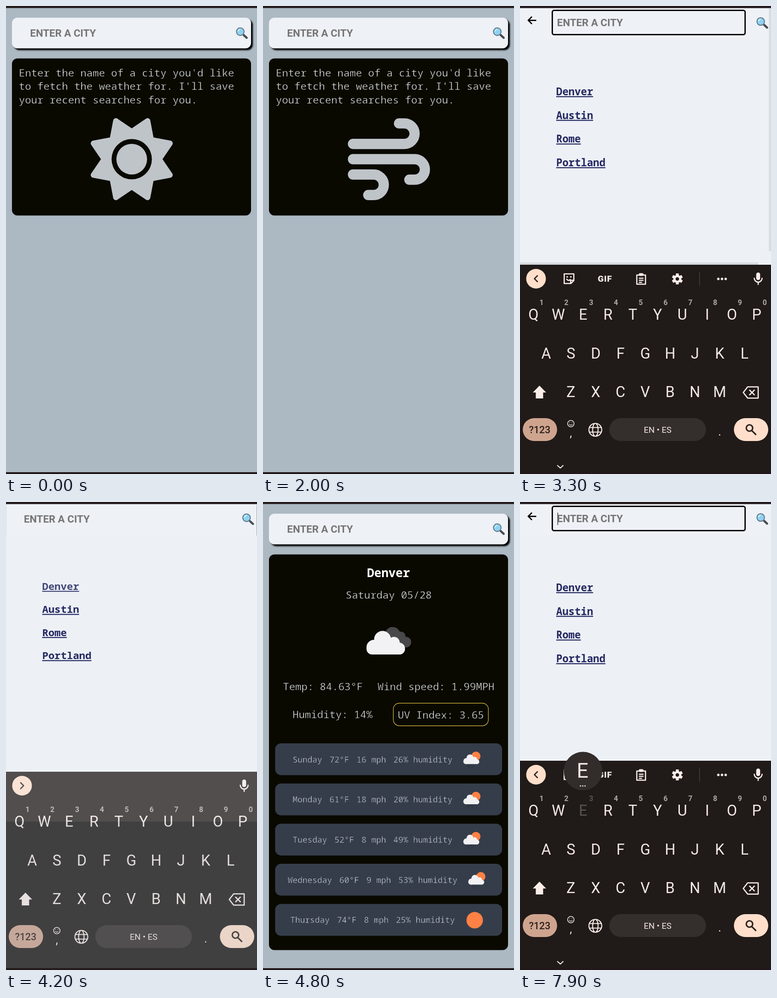
Animation, 548 px wide and 1022 px high, one loop 8 s. Source, as an HTML page:

```html
<!DOCTYPE html>
<html lang="en">
<head>
<meta charset="utf-8">
<title>Weather search</title>
<style>
  html, body { margin: 0; height: 100%; overflow: hidden; background: #acb8c2; }
  svg { display: block; width: 100vw; height: 100vh; }
  text { white-space: pre; }
  /* the stroke in the card colour thins the letters to a light weight */
  .mono { font: 300 22.4px "Noto Sans Mono", "Liberation Mono", monospace; fill: #e2e4e6; stroke: #090900; stroke-width: .45; }
  .city { font-size: 26px; font-weight: 700; fill: #fff; stroke: none; }
  .day { font-size: 17.92px; fill: #ccd0d6; stroke: #353d4b; }
  .link { font-weight: 700; fill: #242860; stroke: none; text-decoration: underline; }
  .hint { font: 700 22.4px Roboto, sans-serif; fill: #757575; }
  .key { font: 400 32.5px Roboto, sans-serif; fill: #f5e9e5; }
  .num { font: 700 16px Roboto, sans-serif; fill: #aea6a3; }
  .mid { text-anchor: middle; }
  .dim { fill: #5a5350; }
  .line { fill: none; stroke: #fbeee9; stroke-width: 2.6; stroke-linecap: round; stroke-linejoin: round; }
  .dark { stroke: #2b211d; }
  .solid { fill: #fbeee9; }
  .bar { fill: #eef1f6; filter: drop-shadow(4px 4px 1.5px #000); }
</style>
</head>
<body>
<svg id="stage" viewBox="0 0 548 1022" preserveAspectRatio="none"></svg>
<script>
const LOOP = 8000, STEP = 100;
const stage = document.getElementById('stage');

const rect = (x, y, w, h, fill, r = 0, more = '') =>
  `<rect x="${x}" y="${y}" width="${w}" height="${h}" rx="${r}" fill="${fill}" ${more}/>`;
const circle = (x, y, r, fill) => `<circle cx="${x}" cy="${y}" r="${r}" fill="${fill}"/>`;
const text = (x, y, cls, str, more = '') => `<text x="${x}" y="${y}" class="${cls}" ${more}>${str}</text>`;
const line = (d, cls = '', more = '') => `<path class="line ${cls}" d="${d}" ${more}/>`;
const at = (x, y, body, more = '') => `<g transform="translate(${x} ${y}) ${more}">${body}</g>`;

// Welcome card
const black = '#090900', silver = '#bfc4c9';
function sun() {
  const points = Array.from({ length: 16 }, (_, i) => {
    const a = i * Math.PI / 8, r = i % 2 ? 90.4 : 60;
    return `${(r * Math.sin(a)).toFixed(1)},${(-r * Math.cos(a)).toFixed(1)}`;
  }).join(' ');
  return at(274.5, 334.5,
    `<polygon points="${points}" fill="${silver}" stroke="${silver}" stroke-width="12" stroke-linejoin="round"/>` +
    circle(0, 0, 44, black) + circle(0, 0, 33.5, silver));
}
const gust = (x, y, length, turn) => {
  const end = x + length;
  return `M${x} ${y}H${end}A22.4 22.4 0 0 ${turn > 0 ? 1 : 0} ${end} ${y + turn * 44.8}h-11.5`;
};
const wind = `<path d="${gust(196.5, 301.2, 112, -1)}${gust(196.5, 334.5, 134.5, 1)}${gust(196.5, 368, 44.8, 1)}"
  fill="none" stroke="${silver}" stroke-width="22.4" stroke-linecap="round"/>`;

const intro = ["Enter the name of a city you'd like", "to fetch the weather for. I'll save", 'your recent searches for you.'];
const welcome = rect(13, 114.5, 522, 343, black, 12) +
  intro.map((s, i) => text(28, 154 + i * 29.4, 'mono', s)).join('') +
  `<g id="sun">${sun()}</g><g id="wind">${wind}</g>`;

// Weather card
const cloud = circle(-26, 14, 16, '#f2f1f3') + circle(-7, -3, 18.5, '#f2f1f3') + circle(18, 4, 12.5, '#f2f1f3') +
  circle(29, 17, 13, '#f2f1f3') + rect(-42, 6, 84, 24, '#f2f1f3', 12);
const backCloud = circle(15, -13, 17, '#48484a') + circle(33, -10, 10, '#48484a') +
  circle(44, 3, 11.5, '#48484a') + rect(8, -12, 38, 26, '#48484a', 10);
const orange = '#ff8144';
const drizzle = line('M-9 13l-1 2M-3 12l-1 2M3 13l-1 2M-7 17l-1 1M0 17l-1 1', '', 'style="stroke:#242a35;stroke-width:1.4"');
const showers = circle(8, -7.5, 10, orange) + at(-2, -2.5, cloud, 'scale(.41)') + drizzle;

const forecast = [
  ['Sunday', '72°F', '16 mph', '26% humidity'],
  ['Monday', '61°F', '18 mph', '20% humidity'],
  ['Tuesday', '52°F', '8 mph', '49% humidity'],
  ['Wednesday', '60°F', '9 mph', '53% humidity'],
  ['Thursday', '74°F', '8 mph', '25% humidity']
];
function dayRow(cells, i) {
  const y = 527 + i * 87.7, cell = 10.75, gap = 16, icon = 54;
  let x = 274.3 - (cells.join('').length * cell + 4 * gap + icon) / 2;
  let out = rect(26.5, y, 495.5, 69.5, '#353d4b', 13);
  for (const s of cells) {
    out += text(x, y + 41.5, 'mono day', s);
    x += s.length * cell + gap;
  }
  return out + at(x + icon / 2, y + 35.5, i === 4 ? circle(0, 0, 18, orange) : showers);
}
const weather = rect(13, 114.5, 522, 864, black, 12) +
  text(274, 164, 'mono city mid', 'Denver') +
  text(274.5, 211, 'mono mid', 'Saturday 05/28') +
  at(268, 303, backCloud + cloud) +
  text(43.5, 411, 'mono', 'Temp: 84.63°F') + text(250, 411, 'mono', 'Wind speed: 1.99MPH') +
  text(64.5, 472, 'mono', 'Humidity: 14%') +
  rect(284.5, 439.3, 207.5, 49.3, 'none', 13, 'stroke="#e3c341" stroke-width="1.2"') +
  text(294.3, 473, 'mono', 'UV Index: 3.65') +
  forecast.map(dayRow).join('');

// Search header and recent list
const lens = line('M4.5 4.5L11 10.5', '', 'style="stroke:#454b50;stroke-width:4.6"') +
  circle(-3, -3, 9.3, '#5d7684') + circle(-3, -3, 7.3, '#8ed2f3') +
  line('M-7.5 -4a5 5 0 0 1 4 -4', '', 'style="stroke:#d6f1fd;stroke-width:2"');
const header = '<rect id="bar" class="bar"/>' +
  `<g id="field"><g id="box">${rect(-2, -2, 0, 57, '#fff', 6)}${rect(0, 0, 0, 53, '#eef1f6', 4, 'stroke="#0a0a0a" stroke-width="3"')}</g>
   <g id="back">${line('M8.5 0H-8M-1 -8L-9 0L-1 8', '', 'style="stroke:#000;stroke-width:2.7;stroke-linecap:butt;stroke-linejoin:miter"')}</g></g>` +
  text(0, 0, 'hint', 'ENTER A CITY', 'id="hint"') +
  rect(0, 0, 1.4, 27, '#333', 0, 'id="caret"') + `<g id="lens">${lens}</g>`;
const recent = ['Denver', 'Austin', 'Rome', 'Portland'];
const panel = rect(0, 0, 548, 1089, '#edf1f6', 0, 'id="sheet"') +
  recent.map((s, i) => text(79, 121.6 + i * 51.7, 'mono link', s, i ? '' : 'id="picked"')).join('');

// Keyboard
const keyRow = (letters, x, y) => [...letters].map((c, i) =>
  text(x + i * 54.15, y, 'key mid', c, c === 'E' ? 'id="keyE"' : '')).join('');
const peach = '#ffdfcb';
const gear = Array.from({ length: 6 }, (_, i) =>
  `<rect x="-3.2" y="-12" width="6.4" height="8" rx="1" class="solid" transform="rotate(${i * 60})"/>`).join('') +
  circle(0, 0, 8.8, '#fbeee9') + circle(0, 0, 3.8, '#201a18');
const tools =
  at(107, 595.5, line('M-10.5 -10.5H10.5V4L4 10.5H-10.5ZM10 3.5H3.5V10M-5 1q3.5 5 8 1') +
    circle(-4, -4, 1.8, '#fbeee9') + circle(4, -4, 1.8, '#fbeee9')) +
  text(185.5, 602, 'key mid', 'GIF', 'style="font-size:19px;font-weight:900;letter-spacing:.8px"') +
  at(264.5, 596.5, line('M-9.5 -9H9.5V11H-9.5ZM-4 -2H4M-4 2.5H4M-4 7H1') + rect(-5, -13, 10, 6, '#fbeee9', 2)) +
  at(343.5, 596, gear) + rect(391.5, 580, 1.2, 31, '#4d4643') +
  [-8, 0, 8].map(x => circle(441 + x, 596, 2.7, '#fbeee9')).join('');
const mic = rect(-4.3, -13.5, 8.6, 16.5, '#fbeee9', 4.3) + line('M-8.5 -1a8.5 8.5 0 0 0 17 0M0 8V12.5');
const globe = line('M-14 0a14 14 0 1 0 28 0a14 14 0 1 0 -28 0M-6 0a6 14 0 1 0 12 0a6 14 0 1 0 -12 0M-12.5 -5H12.5M-12.5 5H12.5',
  '', 'style="stroke-width:2.2"');
const smile = line('M-7 0a7 7 0 1 0 14 0a7 7 0 1 0 -14 0M-3 2q3 3 6 0M-2.5 -2h.1M2.5 -2h.1', '', 'style="stroke-width:1.6"');
const keyboard = rect(0, 565, 548, 860, '#201a18') +
  `<g id="tools">${tools}</g>` +
  circle(35, 595.5, 21.5, peach) + at(35, 595.5, line('M3 -6.5L-3.5 0L3 6.5', 'dark', 'id="chevron"')) +
  at(520, 595.5, mic) +
  [...'1234567890'].map((c, i) => text(47 + i * 54.15, 653, 'num mid', c, i === 2 ? 'id="num3"' : '')).join('') +
  keyRow('QWERTYUIOP', 29.5, 684.5) + keyRow('ASDFGHJKL', 57, 769.5) + keyRow('ZXCVBNM', 111, 854) +
  '<path class="solid" d="M42.5 829L57 844H50.5V857H34.5V844H28Z"/>' +
  at(504, 844, line('M-16.5 0L-7 -12.3H16V12.3H-7ZM-2.5 -5L7.5 5M7.5 -5L-2.5 5')) +
  rect(6, 900, 75, 50, '#cfa48f', 25) +
  text(43, 932.5, 'key mid', '?123', 'style="font-size:21.5px;font-weight:500;fill:#2b211d"') +
  at(111, 912, smile) + text(111, 941, 'key mid', ',', 'style="font-size:25px"') +
  at(164.5, 925.5, globe) + rect(195, 900, 211, 50, '#342e2c', 25) +
  text(300.5, 931.5, 'key mid', 'EN • ES', 'style="font-size:18.5px"') +
  text(436, 938, 'key mid', '.', 'style="font-size:25px"') +
  rect(467, 900, 75, 50, peach, 25) +
  at(504, 925, line('M-10 -3.5a7 7 0 1 0 14 0a7 7 0 1 0 -14 0M2.5 2.5L10.5 10.5', 'dark', 'style="stroke-width:3.2"')) +
  line('M82 1003.5L88 1009L94 1003.5', '', 'style="stroke-width:2.2"') +
  `<g id="popup">${circle(137.5, 587.5, 42, '#322c2a')}${text(136.5, 602, 'key mid', 'E', 'style="font-size:45px"')}
   ${[-5, 0, 5].map(x => circle(137 + x, 620, 1.6, '#e5d9d5')).join('')}</g>`;

stage.innerHTML = rect(0, 0, 548, 1022, '#acb8c2') +
  `<g id="welcome">${welcome}</g><g id="weather">${weather}</g>${header}<g id="panel">${panel}</g>` +
  rect(0, 565, 548, 457, '#fdfdfd', 0, 'id="blank"') +
  `<g id="thumbs" fill="#6c686c" fill-opacity=".48"><rect id="thumbV" x="543.5" y="5" width="4.5"/><rect id="thumbH" y="560" height="5"/></g>` +
  `<g id="keyboard">${keyboard}</g>` +
  rect(0, 0, 548, 4, '#22181a') + rect(0, 4, 548, 1, '#716f74') + rect(0, 1018, 548, 4, '#22181a');

const el = {};
stage.querySelectorAll('[id]').forEach(n => el[n.id] = n);
const [boxRing, boxEdge] = el.box.children;

const clamp = v => Math.min(1, Math.max(0, v));
function bezier(x1, y1, x2, y2) {
  const curve = (a, b, u) => 3 * a * u * (1 - u) ** 2 + 3 * b * u * u * (1 - u) + u ** 3;
  return x => {
    if (x <= 0 || x >= 1) return clamp(x);
    let lo = 0, hi = 1;
    for (let i = 0; i < 24; i++) {
      const m = (lo + hi) / 2;
      curve(x1, x2, m) < x ? lo = m : hi = m;
    }
    return curve(y1, y2, lo);
  };
}
const ease = bezier(.25, .1, .25, 1), rise = bezier(.4, 0, .2, 1);

const first = { start: 2800, panel: 2747.6, keys: 2717, thumbV: 530, thumbH: 520 };
const second = { start: 6700, panel: 6675, keys: 6606, thumbV: 312, thumbH: 548 };
const CLOSE = 4200;

const show = (node, on) => node.style.display = on ? '' : 'none';
const move = (node, x, y) => node.setAttribute('transform', `translate(${x} ${y})`);
const set = (node, attrs) => { for (const k in attrs) node.setAttribute(k, attrs[k]); };

function draw(t) {
  const visit = t < second.start ? first : second;
  const closing = t >= CLOSE && t < second.start;
  const open = t >= visit.start && !closing;
  const age = t - visit.start;

  let q = 0, shift = 400, alpha = 0;
  if (open) {
    q = ease((t - visit.panel) / 300);
    alpha = rise((t - visit.keys) / 285);
    shift = 400 * (1 - alpha);
  } else if (closing) {
    q = 1 - ease((t - CLOSE + 12) / 300);
    const u = clamp((t - CLOSE + 49) / 200);
    alpha = 1 - u;
    shift = 400 * u * u;
  }

  show(el.welcome, t < 4800);
  show(el.weather, t >= 4800);
  show(el.sun, t < 2000);
  show(el.wind, t >= 2000);

  const lift = 22.2 * q;
  set(el.bar, { x: 13 - 13 * q, y: 25.5 - lift, width: 522 + 26 * q, height: 67 + 6 * q, rx: 12 * (1 - q) });
  show(el.field, open);
  const boxWidth = 394 + 27 * q;
  boxRing.setAttribute('width', boxWidth + 4);
  boxEdge.setAttribute('width', boxWidth);
  move(el.box, 84 - 13.5 * q, 32 - 22.5 * q);
  move(el.back, 41 - 14 * q, 53.5 - lift);
  set(el.hint, { x: open ? 94.8 - 14 * q : 52.6 - 14 * q, y: 66.5 - lift });
  set(el.caret, { x: 95 - 13.2 * q, y: 45.5 - lift });
  show(el.caret, open && Math.floor(age / 500) % 2 === 0);
  move(el.lens, 514.5 + 14 * q, 59 - lift);

  show(el.panel, q > 0);
  el.panel.setAttribute('transform', `translate(0 73.3) scale(1 ${q})`);
  el.sheet.setAttribute('height', closing ? 640 : 1089);
  el.picked.style.fill = closing ? '#434877' : '';

  show(el.blank, open);
  show(el.thumbs, open);
  el.thumbs.style.opacity = clamp((600 - age) / 300);
  el.thumbV.setAttribute('height', visit.thumbV);
  el.thumbH.setAttribute('width', visit.thumbH);

  show(el.keyboard, alpha > 0);
  el.keyboard.style.opacity = alpha;
  move(el.keyboard, 0, shift);
  el.tools.style.opacity = visit === first ? clamp((3900 - t) / 400) : 1;
  el.chevron.setAttribute('transform', visit === first && t >= 3700 ? 'scale(-1 1)' : '');
  const pressed = t >= 7900;
  show(el.popup, pressed);
  el.keyE.classList.toggle('dim', pressed);
  el.num3.classList.toggle('dim', pressed);
}

const begin = performance.now();
function tick() {
  const t = (performance.now() - begin) % LOOP;
  draw(Math.floor(t / STEP) * STEP);
  requestAnimationFrame(tick);
}
tick();
</script>
</body>
</html>
```
